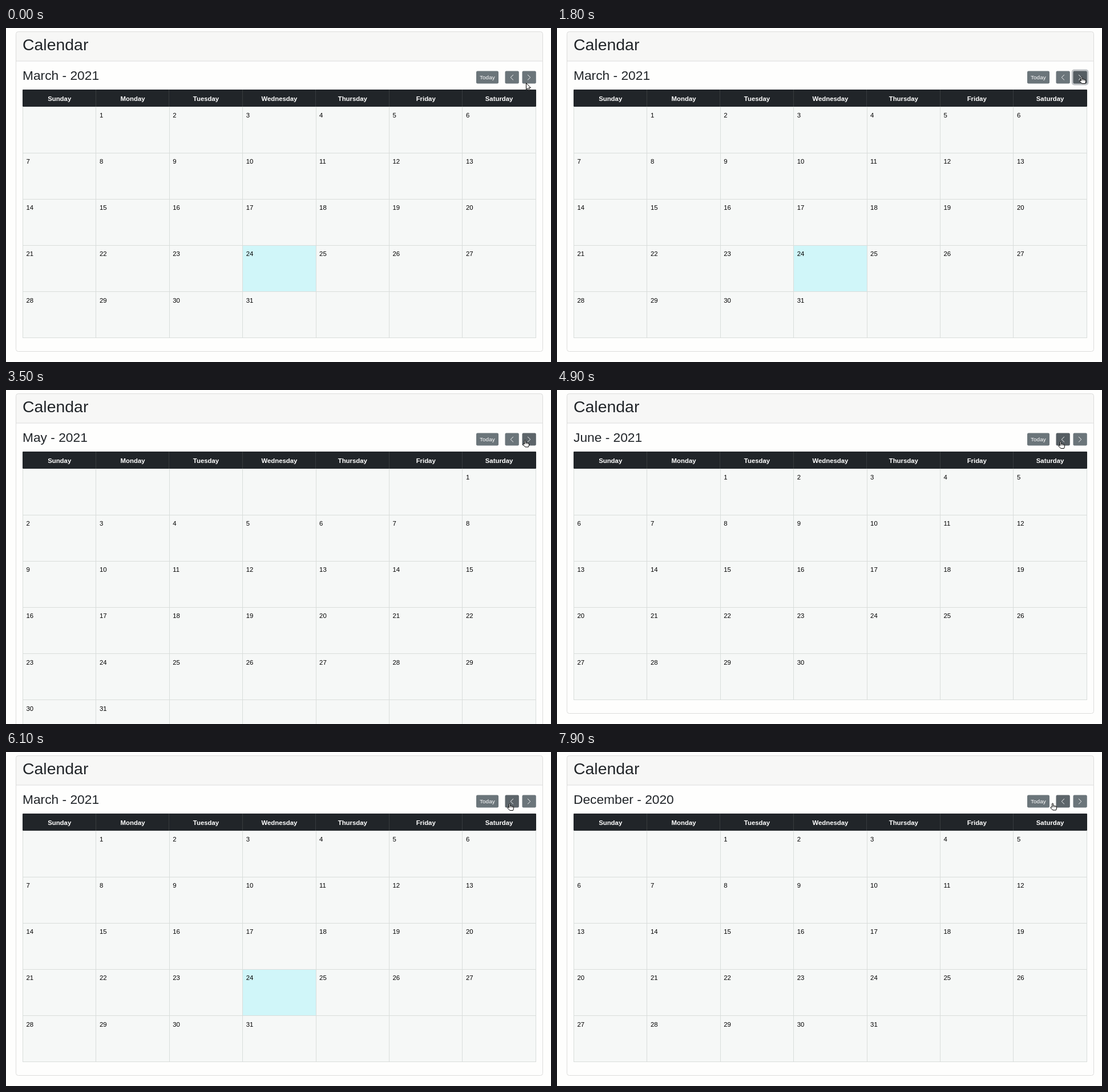
Write an HTML page that moves like this. It is 955x586 px and loops after 8000 ms.

```html
<!DOCTYPE html>
<html lang="en">
<head>
<meta charset="utf-8">
<title>Calendar</title>
<style>
  html, body { margin: 0; width: 100%; height: 100%; overflow: hidden; background: #fefefd; }
  svg { display: block; font: 11.38px "Liberation Sans", Arial, sans-serif; }
  .card { fill: none; stroke: #dcdcdb; }
  .cell { fill: #f6f8f7; stroke: #d9dddb; }
  .today { fill: #d0f6f9; }
  .weekday { fill: #fff; font-weight: bold; text-anchor: middle; }
  .heading { fill: #212529; }
  .button { fill: #6b757a; }
  .button.hover { fill: #5d656a; }
  .button.pressed { fill: #555d62; }
  .ring { fill: #c1c4c7; }
  .chevron { fill: none; stroke: #fff; stroke-width: .9; stroke-linecap: round; stroke-linejoin: round; }
  .cursor { fill: #fff; stroke: #000; stroke-linejoin: round; }
</style>
</head>
<body>
<svg width="955" height="586" viewBox="0 0 955 586">
  <path d="M17.5 58V10a4 4 0 0 1 4-4H936.5a4 4 0 0 1 4 4V58Z" fill="#f7f7f6"/>
  <path d="M17.5 58H940.5" stroke="#dcdcdb"/>
  <rect id="card" class="card" x="17.5" y="6.5" width="923" rx="4"/>
  <text class="heading" x="29" y="39" font-size="28.45">Calendar</text>
  <text id="month" class="heading" x="29" y="91" font-size="22.76"></text>
  <g id="grid"></g>
  <g id="weekdays"></g>
  <rect class="button" x="824" y="75.5" width="39" height="22" rx="2.2"/>
  <text x="843.4" y="90" font-size="9.96" fill="#fff" text-anchor="middle">Today</text>
  <g id="prev">
    <rect class="ring" x="871.6" y="72.6" width="30" height="27.8" rx="5"/>
    <rect class="button" x="874.5" y="75.5" width="24.3" height="22" rx="2.2"/>
    <path class="chevron" d="M888.7 82.3L884.2 86.7L888.7 91.1"/>
  </g>
  <g id="next">
    <rect class="ring" x="901.6" y="72.6" width="30" height="27.8" rx="5"/>
    <rect class="button" x="904.5" y="75.5" width="24.3" height="22" rx="2.2"/>
    <path class="chevron" d="M914.3 82.3L918.8 86.7L914.3 91.1"/>
  </g>
  <path id="arrow" class="cursor" d="M.5 .7V12L3.1 9.7L4.9 13.6L6.8 12.7L5 8.9H8.5Z"/>
  <g id="hand" class="cursor">
    <path d="M3.5 7.4V1.7Q3.5.5 4.5.5T5.5 1.7V4.8Q7 4.1 7.6 5.1Q9 4.6 9.6 5.7Q11.4 5.4 11.5 7.2V9.6L10.4 12.5H5L1 8.7Q.4 7.2 1.7 7Z"/>
    <path d="M5.6 5V7.5M7.6 5.4V7.5M9.6 6V7.7" stroke-width=".7"/>
  </g>
</svg>
<script>
const LOOP = 8000;
const COLUMN = 128.4, ROW = 81.15, LEFT = 29.5, TOP = 138;
const WEEKDAYS = ["Sunday", "Monday", "Tuesday", "Wednesday", "Thursday", "Friday", "Saturday"];
const byId = id => document.getElementById(id);

// Each track is a list of [start time, ...values] held until the next entry.
const pointer = [
  [0, "arrow", 911, 96], [500, "arrow", 903, 128], [600, "arrow", 881, 160],
  [700, "arrow", 906, 112], [800, "arrow", 938, 52], [900, "arrow", 945, 0],
  [1000, "arrow", 929, 78], [1300, "none", 0, 0],
  [1600, "hand", 919, 78], [1700, "hand", 916, 84], [1800, "hand", 915, 85],
  [2300, "hand", 909, 89], [2500, "hand", 897, 92], [2600, "hand", 880, 93],
  [2700, "hand", 875, 91], [2800, "hand", 885, 90], [2900, "hand", 900, 88],
  [3000, "hand", 905, 87.5], [4500, "hand", 906, 88], [4700, "hand", 878, 90],
  [7800, "hand", 871, 90], [7900, "hand", 864, 89.5]
];

const months = [
  [0, 2021, 3], [2000, 2021, 4], [3500, 2021, 5], [4000, 2021, 6], [5200, 2021, 5],
  [5700, 2021, 4], [6100, 2021, 3], [6400, 2021, 2], [6700, 2021, 1], [7000, 2020, 12]
];

const NORMAL = 0, HOVER = 1, PRESSED = 2, FOCUSED = 3;
const buttons = {
  next: [
    [0, NORMAL], [1600, HOVER], [1800, FOCUSED], [2000, PRESSED], [2100, HOVER],
    [2500, NORMAL], [2900, HOVER], [3300, PRESSED], [3400, FOCUSED], [3500, HOVER],
    [3900, FOCUSED], [4000, HOVER], [4700, NORMAL]
  ],
  prev: [
    [0, NORMAL], [2600, HOVER], [2900, NORMAL], [4700, HOVER], [4900, PRESSED],
    [5000, FOCUSED], [5200, PRESSED], [5400, HOVER],
    ...[5600, 6000, 6300, 6600, 6900].flatMap(t => [[t, FOCUSED], [t + 100, HOVER]])
  ]
};

const valuesAt = (track, time) => track.findLast(entry => entry[0] <= time).slice(1);

function drawWeekdays() {
  byId("weekdays").innerHTML = '<rect x="29" y="108" width="900" height="30" rx="1" fill="#212529"/>' +
    WEEKDAYS.map((name, i) => {
      const x = LEFT + i * COLUMN;
      const divider = i ? `<path d="M${Math.round(x) - .5} 108V138" stroke="#373b3e"/>` : "";
      return `${divider}<text class="weekday" x="${x + COLUMN / 2}" y="127.5">${name}</text>`;
    }).join("");
}

function drawMonth(year, month) {
  const first = new Date(year, month - 1, 1);
  const offset = first.getDay();
  const days = new Date(year, month, 0).getDate();
  const rows = Math.ceil((offset + days) / 7);
  const snap = value => Math.floor(value) + .5;
  let cells = "", highlight = "";
  for (let i = 0; i < rows * 7; i++) {
    const column = i % 7, row = Math.floor(i / 7), day = i - offset + 1;
    const x = snap(LEFT + column * COLUMN), y = snap(TOP + row * ROW);
    const width = snap(LEFT + (column + 1) * COLUMN) - x;
    const height = snap(TOP + (row + 1) * ROW) - y;
    const isToday = year === 2021 && month === 3 && day === 24;
    const label = day > 0 && day <= days
      ? `<text x="${LEFT + column * COLUMN + 6}" y="${TOP + row * ROW + 19}">${day}</text>` : "";
    cells += `<rect class="cell${isToday ? " today" : ""}" x="${x}" y="${y}" width="${width}" height="${height}"/>${label}`;
  }
  byId("grid").innerHTML = cells;
  byId("month").textContent = `${first.toLocaleString("en-US", { month: "long" })} - ${year}`;
  byId("card").setAttribute("height", 561 + (rows - 5) * ROW);
}

function drawButton(id, state) {
  const [ring, face] = byId(id).children;
  ring.style.display = state === FOCUSED ? "" : "none";
  face.setAttribute("class", "button" + ["", " hover", " pressed", " pressed"][state]);
}

function drawPointer(kind, x, y) {
  for (const id of ["arrow", "hand"]) {
    byId(id).style.display = id === kind ? "" : "none";
    byId(id).setAttribute("transform", `translate(${x} ${y})`);
  }
}

let shownMonth = "";
const start = performance.now();

function render(now) {
  const time = Math.max(0, now - start) % LOOP;
  const date = valuesAt(months, time);
  if (String(date) !== shownMonth) {
    drawMonth(...date);
    shownMonth = String(date);
  }
  for (const id in buttons) drawButton(id, valuesAt(buttons[id], time)[0]);
  drawPointer(...valuesAt(pointer, time));
  requestAnimationFrame(render);
}

drawWeekdays();
render(start);
</script>
</body>
</html>
```
